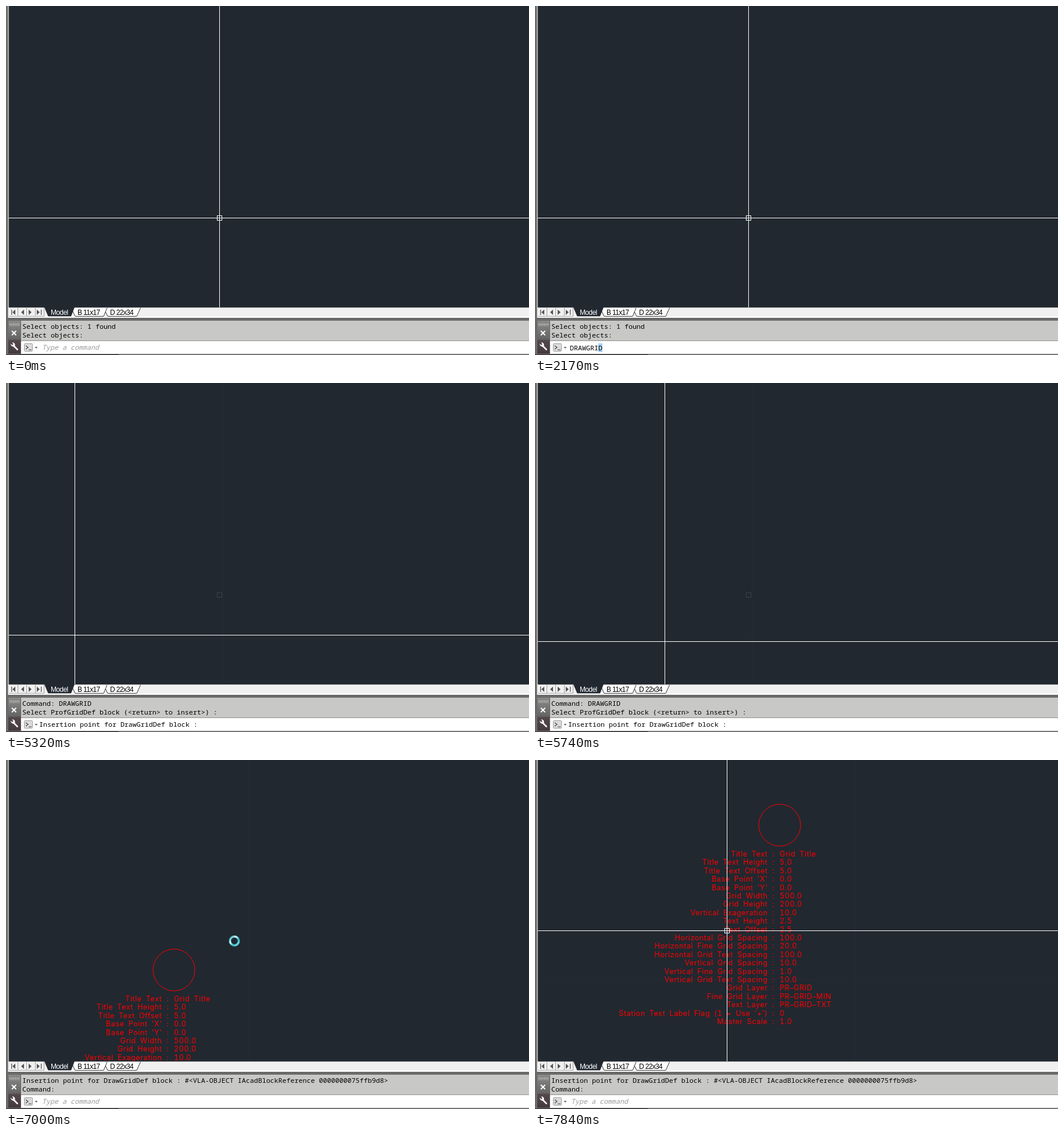
Animation of 900 by 600 pixels, one loop 8 s. Source, as an HTML page:

```html
<!DOCTYPE html>
<html lang="en">
<head>
<meta charset="utf-8">
<title>Draw grid command</title>
<style>
  html, body { margin: 0; width: 100%; height: 100%; overflow: hidden; background: #212830; }
  svg { display: block; width: 900px; height: 600px; }
  text { white-space: pre; }
  .mono { font: 11.667px "Noto Sans Mono", "DejaVu Sans Mono", monospace; fill: #000; }
  .hint { font-style: italic; fill: #9a9a9a; }
  .tab { font: 12px "Liberation Sans", Arial, sans-serif; letter-spacing: -.65px; }
  .block text {
    font: 400 12.6px Inter, Roboto, sans-serif; font-variant-numeric: tabular-nums;
    letter-spacing: .55px; word-spacing: 3.2px; fill: #f00;
  }
  .block .label { text-anchor: end; }
  .crisp { shape-rendering: crispEdges; }
  .thin { fill: none; stroke-width: 1; }
</style>
</head>
<body>
<svg viewBox="0 0 900 600">
  <defs>
    <clipPath id="view"><rect x="5" width="895" height="518"/></clipPath>
    <linearGradient id="grip" x2="0" y2="1">
      <stop stop-color="#8b8b8a"/><stop offset=".55" stop-color="#666465"/>
      <stop offset=".6" stop-color="#53474b"/><stop offset="1" stop-color="#453a3f"/>
    </linearGradient>
    <linearGradient id="spin" x2="1" y2="1">
      <stop stop-color="#2f9fb0"/><stop offset=".35" stop-color="#d9f6f8"/>
      <stop offset=".65" stop-color="#35b9c4"/><stop offset="1" stop-color="#8fe6ea"/>
    </linearGradient>
    <pattern id="dots" width="3" height="3" patternUnits="userSpaceOnUse">
      <rect width="2" height="2" fill="#b9b9b9"/>
    </pattern>
  </defs>

  <!-- drawing area -->
  <rect width="900" height="600" fill="#212830"/>
  <g clip-path="url(#view)">
    <g id="world">
      <path id="axes" class="thin crisp" stroke="#252c3b" d="M129.5-900V900M-900 265.5H900"/>
      <g id="block" class="block">
        <circle class="thin" r="36" stroke="#f00"/>
      </g>
    </g>
    <rect id="trace" class="thin crisp" x="363.5" y="360.5" width="8" height="8" stroke="#3b4249"/>
    <g id="cursor" class="thin crisp" stroke="#fff">
      <path id="cross" d="M.5-600V600M-900 .5H900"/>
      <rect id="pick" x="-3.5" y="-3.5" width="8" height="8"/>
    </g>
    <g id="busy" fill="none">
      <circle r="7.6" stroke="#176a78" stroke-width="4.4"/>
      <circle r="7.6" stroke="url(#spin)" stroke-width="3.2"/>
    </g>
  </g>

  <!-- window edge and layout tabs -->
  <g class="crisp">
    <rect width="4" height="600" fill="#6c6c69"/>
    <rect x="3" width="2" height="536" fill="#a9a9a6"/>
    <rect x="4" y="518" width="896" height="18" fill="#f0f0f0"/>
    <rect x="4" y="534" width="896" height="2" fill="#fff"/>
    <path class="thin" stroke="#a0a0a0" d="M5 518.5H900M5 533.5H66M20.5 519V533M35.5 519V533M50.5 519V533M65.5 519V533"/>
  </g>
  <path fill="#555" d="M9 522h1.3v9H9zM16 522v9l-5-4.5zM31 522v9l-5-4.5zM39 522v9l5-4.5zM53 522v9l5-4.5zM60 522h1.3v9H60z"/>
  <path fill="#fff" stroke="#333" d="M168 519L175 533.5H225L231.500 519"/>
  <path fill="#fff" stroke="#333" d="M112 519L119 533.5H168L174 519"/>
  <path fill="#212830" d="M66 518L72.500 533.5H112L118 518z"/>
  <text class="tab" x="77" y="531" fill="#fff">Model</text>
  <text class="tab" x="123" y="531">B 11x17</text>
  <text class="tab" x="179" y="531">D 22x34</text>

  <!-- command window -->
  <g class="crisp">
    <rect y="536" width="900" height="64" fill="#6a6a69"/>
    <rect x="26" y="541" width="874" height="34" fill="#c8c8c6"/>
    <rect x="26" y="575" width="874" height="1" fill="#8f8f8d"/>
    <rect x="26" y="576" width="874" height="22" fill="#fff"/>
    <rect y="598" width="900" height="2" fill="#77777a"/>
    <rect y="599" width="194" height="1" fill="#222"/>
    <rect x="4" y="541" width="21" height="57" fill="url(#grip)"/>
    <rect x="6" y="545" width="17" height="5" fill="url(#dots)"/>
  </g>
  <path fill="none" stroke="#fff" stroke-width="2" d="M10 558.500l7.500 7.500M17.500 558.500l-7.500 7.500"/>
  <path fill="none" stroke="#fff" stroke-width="2.600" stroke-linecap="round" d="M13.500 584.500L19.500 590.500"/>
  <path fill="#fff" d="M8 580.500l2.800 2.600 2-1.800-2.400-2.700c3-.7 5.800 1.800 5 5.400-1.800 3.400-7.400 1.200-7.400-3.500z"/>
  <rect x="31.500" y="580.500" width="14" height="13" rx="1" fill="#dcdcdc" stroke="#9b9b9b"/>
  <path fill="none" stroke="#444" stroke-width="1.200" d="M34 584l4 3-4 3M39 591h5"/>
  <path fill="#666" d="M49.500 586h5l-2.500 3z"/>
  <text id="line1" class="mono" x="28" y="555"></text>
  <text id="line2" class="mono" x="28" y="570"></text>
  <rect id="mark" class="crisp" x="109" y="580" width="7" height="15" fill="#a6d0f5"/>
  <text id="input" class="mono"></text>
  <rect id="caret" class="crisp" y="580" width="1" height="15" fill="#000"/>
</svg>

<script>
const LOOP = 8000, STEP = 70;
const CHAR = 7;
const el = id => document.getElementById(id);
const show = (id, on) => { el(id).style.display = on ? '' : 'none'; };
const move = (id, [x, y]) => el(id).setAttribute('transform', `translate(${Math.round(x)} ${Math.round(y)})`);

const fields = `Title Text:Grid Title
Title Text Height:5.0
Title Text Offset:5.0
Base Point 'X':0.0
Base Point 'Y':0.0
Grid Width:500.0
Grid Height:200.0
Vertical Exageration:10.0
Text Height:2.5
Text Offset:2.5
Horizontal Grid Spacing:100.0
Horizontal Fine Grid Spacing:20.0
Horizontal Grid Text Spacing:100.0
Vertical Grid Spacing:10.0
Vertical Fine Grid Spacing:1.0
Vertical Grid Text Spacing:10.0
Grid Layer:PR–GRID
Fine Grid Layer:PR–GRID–MIN
Text Layer:PR–GRID–TXT
Station Text Label Flag (1 = Use '+'):0
Master Scale:1.0`;

function addText(x, y, content, cls = '') {
  const node = document.createElementNS('http://www.w3.org/2000/svg', 'text');
  node.setAttribute('x', x);
  node.setAttribute('y', y);
  node.setAttribute('class', cls);
  node.textContent = content;
  el('block').append(node);
}

fields.split('\n').forEach((field, i) => {
  const [label, value] = field.split(':'), y = 54 + i * 14.4;
  addText(-20.5, y, label, 'label');
  addText(-12.8, y, ':');
  addText(0, y, value);
});

// Each key is [time, x, y]; motion eases in and out between keys.
function along(keys, t) {
  const next = keys.findIndex(key => key[0] > t);
  if (next === 0) return keys[0].slice(1);
  if (next < 0) return keys.at(-1).slice(1);
  const [t0, x0, y0] = keys[next - 1], [t1, x1, y1] = keys[next];
  const p = (t - t0) / (t1 - t0), e = p * p * (3 - 2 * p);
  return [x0 + (x1 - x0) * e, y0 + (y1 - y0) * e];
}

const pointerKeys = [
  [4760, 367, 364], [5320, 118, 433], [5880, 243, 446],
  [6510, 243, 446], [6790, 348, 396],
  [7349, 348, 396], [7350, 525, 62], [7840, 330, 293]
];
const panKeys = [[6860, 244, 446], [7280, 418, 118], [7350, 421, 112]];

const typing = [420, 560, 840, 910, 1330, 1470, 1750];
const pickPrompt = 'Select ProfGridDef block (<return> to insert>) :';
const placePrompt = 'Insertion point for DrawGridDef block :';

function history(t) {
  if (t < 4060) return ['Select objects: 1 found', 'Select objects:'];
  if (t < 4830) return ['Select objects:', 'Command: DRAWGRID'];
  if (t < 6300) return ['Command: DRAWGRID', pickPrompt];
  return [placePrompt + ' #<VLA-OBJECT IAcadBlockReference 0000000075ffb9d8>', 'Command:'];
}

// Returns the text, its left edge and the caret position, if any.
function entry(t) {
  if (t < 350 || t >= 6300) return { text: 'Type a command', x: 62, hint: true };
  if (t < 2170) {
    const count = typing.filter(key => key <= t).length;
    return { text: 'drawgri'.slice(0, count), x: 60, caret: 60 + count * CHAR };
  }
  if (t < 3360) return { text: 'DRAWGRID', x: 60 };
  if (t < 4060) return { text: t < 3710 ? 'DRAWGRId' : 'DRAWGRID', x: 60, caret: t < 3850 && 116 };
  if (t < 4830) return { text: pickPrompt, x: 57, caret: t < 4620 && 403 };
  return { text: placePrompt, x: 57 };
}

function drawCommandLine(t) {
  [el('line1').textContent, el('line2').textContent] = history(t);
  const { text, x, hint, caret } = entry(t), input = el('input');
  input.textContent = text;
  input.setAttribute('x', x);
  input.setAttribute('y', x === 60 ? 592 : 591);
  input.classList.toggle('hint', !!hint);
  show('mark', t >= 2170 && t < 3360);
  show('caret', caret);
  if (caret) el('caret').setAttribute('x', caret);
}

function drawView(t) {
  const picking = t >= 4060 && t < 4830;
  const placing = t >= 4830 && t < 6370;
  const panning = t >= 6930 && t < 7350;
  const center = along(panKeys, t);
  move('world', center);
  move('cursor', along(pointerKeys, t));
  move('busy', [center[0] + 104, center[1] - 50]);
  show('axes', t >= 4060);
  show('block', t >= 6300);
  show('trace', t >= 4830 && t < 6930);
  show('cross', !picking && !panning);
  show('pick', !placing && !panning);
  show('busy', panning);
}

const start = performance.now();
function frame() {
  const elapsed = Math.max(0, performance.now() - start) % LOOP;
  const t = Math.floor(elapsed / STEP) * STEP;
  drawCommandLine(t);
  drawView(t);
  requestAnimationFrame(frame);
}
frame();
</script>
</body>
</html>
```
